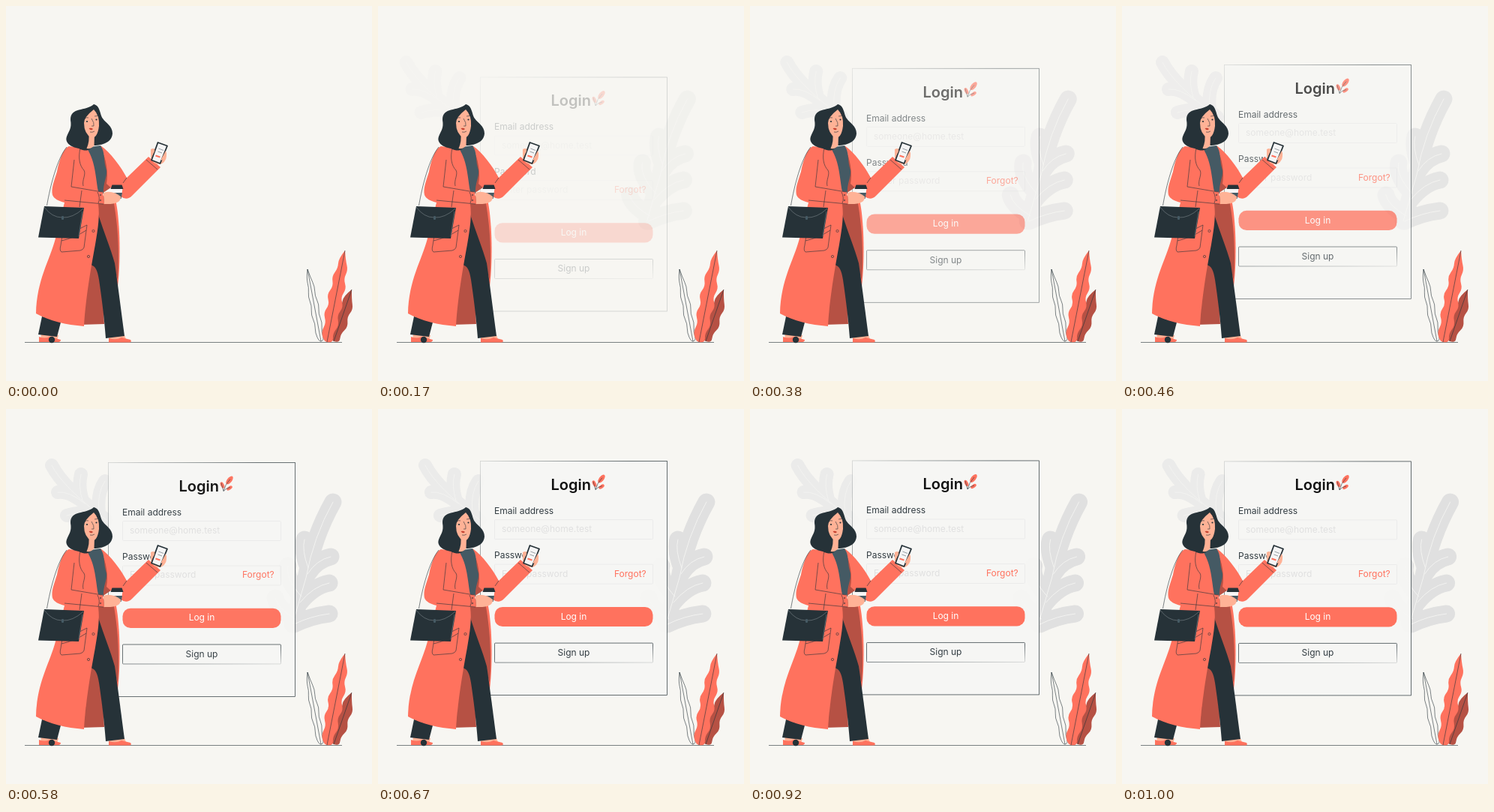
Write an HTML page that moves like this. It is 488 px wide and 500 px high and loops after 1.04 s.

```html
<!DOCTYPE html>
<html lang="en">
<head>
<meta charset="utf-8">
<title>Login</title>
<style>
  html, body { margin: 0; width: 100%; height: 100%; overflow: hidden; background: #f7f6f2; }
  svg { display: block; width: 488px; height: 500px; }
  text { font: 12px Inter, sans-serif; fill: #333d43; }
  .title { font-size: 20px; font-weight: 600; fill: #111; }
  .hint { fill: #e0e0e0; }
  .coral { fill: #ff725e; }
  .rust { fill: #b65144; }
  .dark { fill: #263238; }
  .teal { fill: #455a64; }
  .skin { fill: #ffb296; }
  .line { fill: none; stroke: #263238; stroke-width: .6; }
  .blank { fill: #f7f6f2; stroke: #263238; stroke-width: .6; }
  .field { fill: none; stroke: #ebebeb; }
  .oak { fill: none; stroke-linecap: round; stroke-linejoin: round; }
</style>
</head>
<body>
<svg viewBox="0 0 488 500">
  <defs>
    <path id="oakLeft" d="M63 75Q78 105 136 148M104 122Q98 103 102 87M126 138Q123 112 134 96M107 126Q86 109 71 111M124 141Q100 136 83 142"/>
    <path id="oakRight" d="M438 124Q412 170 402 225L384 287M405 212Q396 188 400 174M404 220Q416 201 435 197M396 250Q374 226 378 209M394 258Q412 236 433 232M388 280Q364 266 361 252M386 287Q408 276 433 273"/>
    <linearGradient id="fadeIn" x2=".4" y2=".4">
      <stop stop-color="#263238" stop-opacity=".2"/>
      <stop offset="1" stop-color="#263238"/>
    </linearGradient>
    <linearGradient id="fadeOut" x1=".6" y1=".4" x2="1" y2="1">
      <stop stop-color="#263238"/>
      <stop offset="1" stop-color="#263238" stop-opacity=".2"/>
    </linearGradient>
  </defs>

  <g id="leaves" class="oak">
    <use href="#oakLeft" stroke="#ebebea" stroke-width="18"/>
    <use href="#oakRight" stroke="#e0e0e0" stroke-width="23"/>
    <g stroke="#f3f3f1">
      <use href="#oakLeft"/>
      <use href="#oakRight"/>
    </g>
  </g>

  <g id="panel">
    <rect x="136.500" width="249" height="312" fill="#f7f7f5" fill-opacity=".92" stroke="url(#fadeIn)" stroke-width=".7"/>
    <text class="title" x="230.500" y="38.300">Login</text>
    <g class="coral">
      <ellipse rx="6.500" ry="3.200" transform="translate(298 23.500) rotate(-52)"/>
      <ellipse rx="4.500" ry="2.300" transform="translate(288.500 30) rotate(65)"/>
      <ellipse rx="4.300" ry="2.200" transform="translate(298 34) rotate(-35)"/>
    </g>
    <path class="line" d="M299 22Q292 29 290 38M287 27L290 38Q293 34 299 33"/>
    <text x="155" y="70.500">Email address</text>
    <rect class="field" x="155.500" y="78" width="211" height="26" rx="1"/>
    <text class="hint" x="165" y="94.700">someone@home.test</text>
    <text x="155" y="129.700">Password</text>
    <rect class="field" x="155.500" y="137.500" width="211" height="26" rx="1"/>
    <text class="hint" x="165" y="154">Enter password</text>
    <text class="coral" x="315" y="154">Forgot?</text>
    <rect class="coral" x="155.500" y="194.300" width="211" height="26.200" rx="10.500"/>
    <text x="261" y="211" text-anchor="middle" style="fill:#fff">Log in</text>
    <rect x="155.500" y="242.500" width="211" height="26" rx="1" fill="none" stroke="url(#fadeOut)" stroke-width=".7"/>
    <text x="261" y="259.500" text-anchor="middle">Sign up</text>
  </g>

  <path class="line" d="M25 448.500H448"/>
  <g id="plant"></g>

  <!-- legs and shoes -->
  <path class="skin" d="M47 436L70 439L68 446H46ZM137 440L158 439L161 447H138Z"/>
  <path class="coral" d="M44 441Q52 444 58 441L73 445Q73 447.500 70 448H44ZM137 443Q147 446 154 442L166 445Q168 448 165 448.500H137Z"/>
  <circle class="dark" cx="61" cy="445" r="4.200"/>
  <path class="dark" d="M48 414L74 418L68 441L43 438Z"/>
  <path class="coral" d="M130 250L146 258C151 280 154 330 149 374L140 330Z"/>
  <path class="rust" d="M120 250L143 258C148 285 152 320 149 365L143 345L119 283ZM110 340L98 425L131 424L127 350Z"/>
  <path class="dark" d="M119 278H123C130 300 140 325 145 343C149 370 154 410 158 440L133 443C131 415 127 385 124 365C122 352 119 346 112 345Z"/>

  <!-- raised arm -->
  <path class="rust" d="M124 188Q138 204 140 242L128 250Z"/>
  <path class="coral" d="M126 186C140 196 153 214 161 229L190 201L206 215L168 253Q161 260 153 254L134 237Q138 215 126 186Z"/>
  <path class="line" d="M187 205L202 218M161 229L156 236"/>
  <path class="teal" d="M105 189L126 186C133 196 129 204 134 219C135 229 129 236 130 250H121Z"/>
  <ellipse class="skin" cx="203.500" cy="200" rx="10.500" ry="11"/>
  <path fill="#f5f5f5" stroke="#263238" stroke-width="1.800" stroke-linejoin="round" d="M202.500 182L215 186.500L205.500 210L194 205.500Z"/>
  <path d="M203.500 190L210 192.500M202.500 194L208 196" stroke="#8b9499" stroke-width=".9"/>
  <path d="M199.500 199.500L205.500 201.500" stroke="#ff725e" stroke-width="2"/>
  <path class="skin" d="M207 204L213 193Q217 201 207 206ZM193 191Q199 188 198 194L193 203Z"/>

  <!-- coat -->
  <path class="coral" d="M84 187C76 190 71 206 68 221C64 234 60 243 62 252C64 257 70 260 78 262L66 310C58 340 41 365 40 410C58 420 80 425 104 427C106 390 114 345 119 318C123 295 125 280 123 264L131 264L129 248L123 247C120 235 120 208 108 190Z"/>
  <path class="line" d="M99 190C96 202 98 213 104 219C107 225 101 232 103 240M91 205L87 241L128 248M78 259L130 264M122 248Q126 256 123 263M75 306Q91 302 108 292L104 322Q103 325 99 326L74 328Q71 326 73 319ZM74 313Q92 309 107 299"/>
  <g class="line">
    <circle cx="116.500" cy="300" r="1.600"/>
    <circle cx="110" cy="334" r="1.600"/>
    <circle cx="126" cy="252" r=".8"/>
    <circle cx="126" cy="259" r=".8"/>
  </g>

  <!-- cup -->
  <path fill="#f5f5f5" d="M140.500 243H155.500L153 260H143Z"/>
  <path class="teal" d="M141 249H155L153.500 257H142Z"/>
  <path class="dark" d="M141.500 238.500H154.500L156.500 244H139.500Z"/>
  <path class="skin" d="M130 249Q141 245 153 254Q154 265 131 264Z"/>

  <!-- bag -->
  <path class="line" d="M54.500 266C59 240 68 204 81 188M98 268L101 246"/>
  <path class="dark" d="M51 267L104 269L97 310L43 308.500Z"/>
  <path d="M51 268Q61 282 75 282Q89 283 103 270M97 307L102 274" fill="none" stroke="#7b858a" stroke-width=".6"/>
  <rect class="teal" x="74" y="280" width="3" height="5" rx="1"/>

  <!-- head -->
  <path class="dark" d="M117 131C126 133 125 145 129 150C133 156 142 160 142 170C141 184 124 186 116 186C112 192 108 195 97 190C86 188 78 182 81 174C84 166 88 163 86 152C86 134 106 141 117 131Z"/>
  <path class="skin" d="M110 168L118 172L117.500 186Q114 191 107.500 190Q112 180 110 168Z"/>
  <path class="skin" d="M117 138Q125 146 124 160Q122 176 114 176Q104 170 104 156Q104 148 117 138Z"/>
  <path class="line" d="M114 150Q118 156 117 160L114 160M105 150Q107 148 110 149M118 147L122 146.500M112 168Q115 169 118 167"/>
  <circle class="dark" cx="108" cy="154" r="1.100"/>
  <circle class="dark" cx="120.500" cy="151.500" r="1.100"/>
  <path d="M110.500 163Q114 162 116 164Q113 167 110.500 163Z" fill="#c6402f"/>
</svg>
<script>
  const LOOP = 1040, STEP = 41.6, START = 42, LAND = 600;
  const leaves = document.getElementById('leaves');
  const panel = document.getElementById('panel');
  const plant = document.getElementById('plant');

  function addPath(cls, d) {
    const el = document.createElementNS('http://www.w3.org/2000/svg', 'path');
    el.setAttribute('class', cls);
    el.setAttribute('d', d);
    plant.append(el);
  }

  // Leaf from base to tip whose two edges sway together
  function wavyLeaf(cls, base, tip, width, waves) {
    const [dx, dy] = [tip[0] - base[0], tip[1] - base[1]];
    const len = Math.hypot(dx, dy), count = waves * 2;
    const edge = side => Array.from({ length: count }, (_, i) => {
      const u = i / count;
      const taper = Math.sqrt(Math.sin(Math.PI * (.15 + .85 * u)));
      const out = width * taper * (side + (i % 2 ? -.32 : .32));
      return [base[0] + dx * u - dy / len * out, base[1] + dy * u + dx / len * out];
    });
    const curve = (pts, end) => pts.map((p, i) => {
      const next = pts[i + 1];
      return `Q${p} ${next ? p.map((v, k) => (v + next[k]) / 2) : end}`;
    }).join('');
    addPath(cls, `M${base}${curve(edge(-1), tip)}${curve(edge(1).reverse(), base)}Z`);
    addPath('line', `M${base}L${tip}`);
  }

  wavyLeaf('blank', [420, 447], [402, 351], 5, 4);
  wavyLeaf('rust', [437, 447], [461, 378], 9, 3);
  wavyLeaf('coral', [428, 448], [452, 326], 9.5, 5);

  function draw(now) {
    const t = Math.floor((now % LOOP + 4) / STEP) * STEP;
    const alpha = Math.min(1, Math.max(0, (t - START) / (LAND - START)));
    // Linear slide in, then a small float past the resting place
    const shift = t < LAND
      ? 1 + (LAND - t) * .0565
      : 1 - 2 * Math.sin(Math.PI * (t - LAND) / (LOOP - LAND));
    panel.setAttribute('transform', `translate(0 ${69.5 + shift})`);
    leaves.setAttribute('transform', `translate(${-shift} 0)`);
    panel.setAttribute('opacity', alpha);
    leaves.setAttribute('opacity', alpha);
  }

  const start = performance.now();
  function tick() {
    draw(performance.now() - start);
    requestAnimationFrame(tick);
  }
  tick();
</script>
</body>
</html>
```
